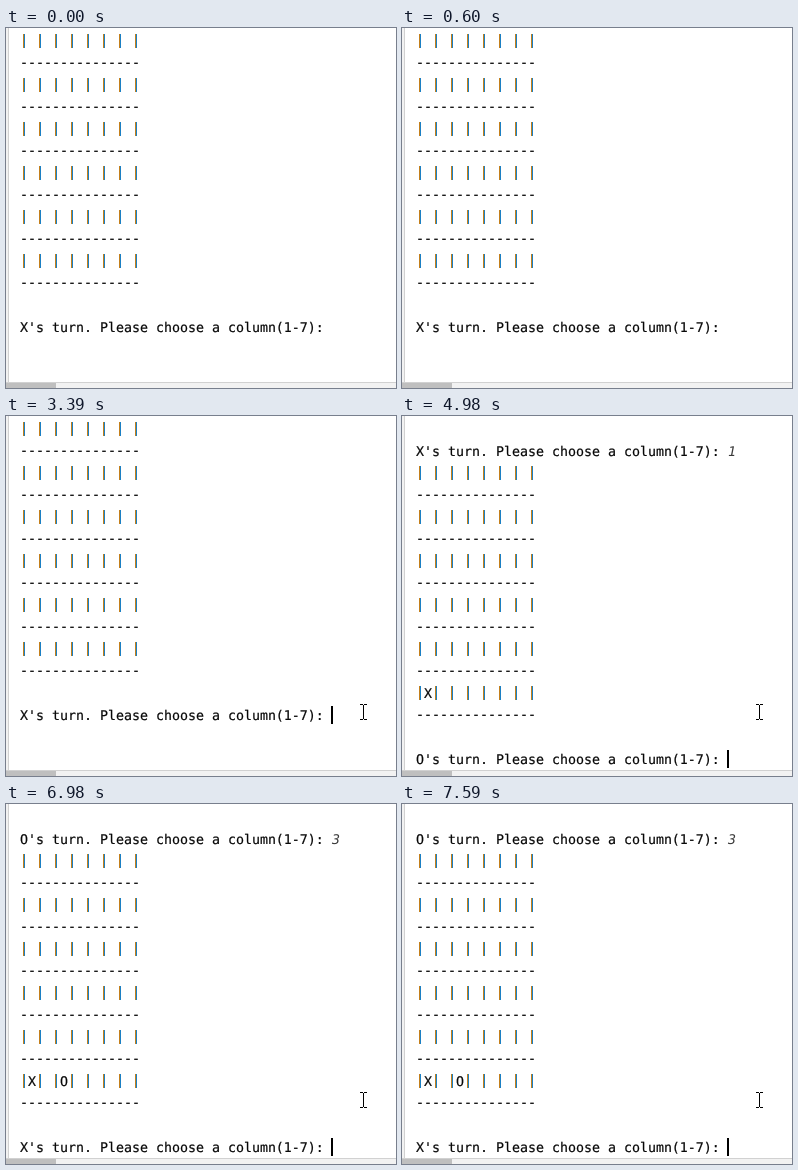
Write an HTML page that moves like this. It is 390 px wide and 360 px high and loops after 8 s.

```html
<!DOCTYPE html>
<html lang="en">
<head>
<meta charset="utf-8">
<title>Four in a row console</title>
<style>
  html, body { margin: 0; width: 100%; height: 100%; overflow: hidden; background: #fff; }
  svg { display: block; }
  text {
    font: 13.29px "DejaVu Sans Mono", monospace;
    fill: #080808;
    stroke: #080808;
    stroke-width: .2px;
    white-space: pre;
    text-rendering: geometricPrecision;
  }
  .warm { fill: #c4801c; stroke: none; }
  .cool { fill: #1c80c4; stroke: none; }
  .input { font-style: italic; fill: #3a3a3a; stroke: none; }
  .fresh { fill: #566052; }
</style>
</head>
<body>
<svg id="stage" width="390" height="360" viewBox="0 0 390 360">
  <rect width="390" height="360" fill="#fff"/>
  <rect width="2" height="354" fill="#f2f2f2"/>
  <rect x="2" width="1" height="354" fill="#d1d1d1"/>
</svg>
<script>
const DURATION = 8000;
const LEFT = 14, CELL = 8, LINE = 22, FIRST_BASELINE = 18;
const PROMPT = "'s turn. Please choose a column(1-7): ";
const INPUT_COLUMN = PROMPT.length + 1;
const stage = document.getElementById("stage");

function add(parent, tag, attrs, content = "") {
  const el = document.createElementNS("http://www.w3.org/2000/svg", tag);
  for (const name in attrs) el.setAttribute(name, attrs[name]);
  el.textContent = content;
  return parent.appendChild(el);
}

const baseline = row => FIRST_BASELINE + row * LINE;

function write(parent, column, row, content, className = "", shift = 0) {
  add(parent, "text", {
    x: LEFT + column * CELL, y: baseline(row) + shift, class: className
  }, content);
}

// Each bar is two pixels wide, with the colour fringes of subpixel text.
function bar(parent, column, row) {
  const middle = LEFT + (column + .5) * CELL;
  const box = { y: baseline(row) - 12, width: 1, height: 14 };
  add(parent, "rect", { ...box, x: middle - 1, class: "warm" });
  add(parent, "rect", { ...box, x: middle, class: "cool" });
}

function board(parent, topRow) {
  for (let i = 0; i < 6; i++) {
    for (let column = 0; column < 15; column += 2) bar(parent, column, topRow + 2 * i);
    write(parent, 0, topRow + 2 * i + 1, "-".repeat(15), "", -1);
  }
}

function caret(parent, column, row) {
  add(parent, "rect", {
    x: LEFT + column * CELL - 1, y: baseline(row) - 14, width: 2, height: 18, fill: "#000"
  });
}

// A group that is visible only between two times of the loop.
function during(start, end) {
  const group = add(stage, "g", {});
  const opacityAt = time => (time >= start && time < end ? 1 : 0);
  const times = [...new Set([0, start, end, DURATION])];
  group.animate(
    times.map(time => ({
      offset: time / DURATION, opacity: opacityAt(time), easing: "steps(1, end)"
    })),
    { duration: DURATION, iterations: Infinity }
  );
  return group;
}

const opening = during(0, 4980);
board(opening, 0);
write(opening, 0, 13, "X" + PROMPT);
caret(during(1000, 4980), INPUT_COLUMN, 13);

const played = during(4980, DURATION);
board(played, 2);
write(played, 1, 12, "X");

const replyTurn = during(4980, 6980);
write(replyTurn, 0, 1, "X" + PROMPT);
write(replyTurn, INPUT_COLUMN, 1, "1", "input");
write(replyTurn, 0, 15, "O" + PROMPT);
caret(during(4980, 5980), INPUT_COLUMN, 15);

const typed = during(5980, 6980);
write(typed, INPUT_COLUMN, 15, "3", "input fresh");
caret(typed, INPUT_COLUMN + 1, 15);

const nextTurn = during(6980, DURATION);
write(nextTurn, 0, 1, "O" + PROMPT);
write(nextTurn, INPUT_COLUMN, 1, "3", "input");
write(nextTurn, 5, 12, "O");
write(nextTurn, 0, 15, "X" + PROMPT);
caret(nextTurn, INPUT_COLUMN, 15);

add(during(1000, DURATION), "path", {
  d: "M354 288.5h3m1 0h3M357.5 289v14M354 303.5h3m1 0h3",
  fill: "none", stroke: "#000"
});

// Horizontal scrollbar
add(stage, "rect", { y: 354, width: 390, height: 6, fill: "#f2f2f2" });
add(stage, "rect", { y: 354, width: 390, height: 1, fill: "#d1d1d1" });
add(stage, "rect", { y: 355, width: 50, height: 5, fill: "#bfbfbf" });
</script>
</body>
</html>
```
